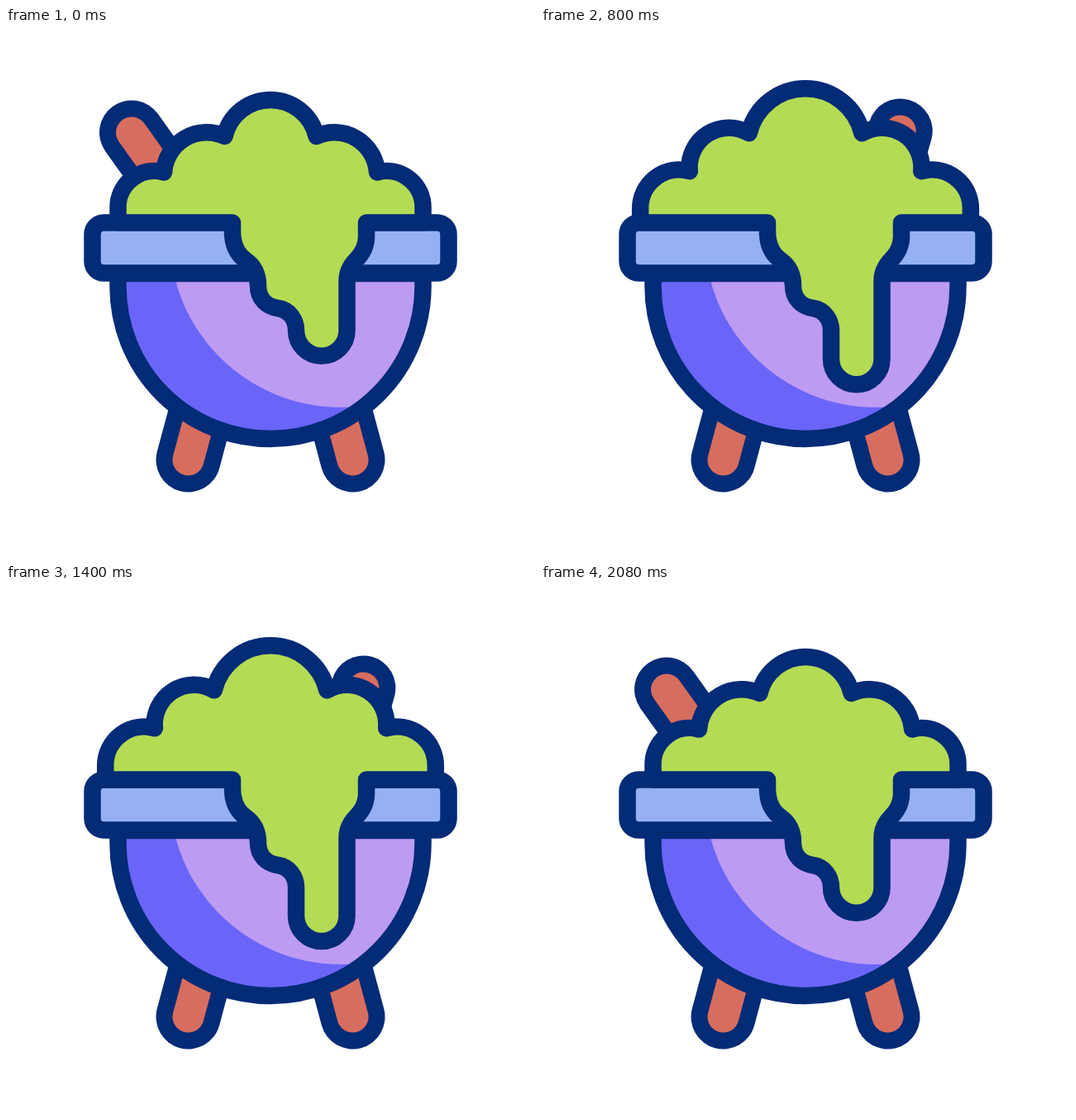
Recreate the animation shown at these times as an HTML page. Size 640 by 640 pixels, loop 2.2 s.

```html
<!DOCTYPE html>
<html lang="en">
<head>
<meta charset="utf-8">
<title>Bubbling cauldron</title>
<style>
  html, body { margin: 0; height: 100%; overflow: hidden; background: #fff; }
  svg { display: block; width: 100%; height: 100%; }
  .ink { stroke: #042b76; stroke-width: 20.5; stroke-linejoin: round; }
  .bar path { fill: none; stroke: #042b76; stroke-width: 78; stroke-linecap: round; }
  .bar path + path { stroke: #d76d5e; stroke-width: 38; }
</style>
</head>
<body>
<svg viewBox="0 0 640 640">
  <defs>
    <clipPath id="inside"><path d="M135.500 297V312.500A184.500 184.500 0 0 0 504.500 312.500V297Z"/></clipPath>
    <g id="leg" class="bar">
      <path d="M220.500 522.500L240 450"/>
      <path d="M220.500 522.500L240 450"/>
    </g>
  </defs>
  <use href="#leg"/>
  <use href="#leg" transform="matrix(-1 0 0 1 640 0)"/>
  <g id="spoon" class="bar"><path d="M0 0V95"/><path d="M0 0V95"/></g>
  <g clip-path="url(#inside)">
    <rect x="120" y="290" width="400" height="220" fill="#6a65f8"/>
    <circle cx="405" cy="252" r="207" fill="#bd9bf3"/>
  </g>
  <path class="ink" fill="none" d="M135.500 297V312.500A184.500 184.500 0 0 0 504.500 312.500V297Z"/>
  <rect class="ink" fill="#95b1f4" x="104.500" y="235.500" width="431" height="61" rx="14"/>
  <path id="goo" class="ink" fill="#b3db53"/>
</svg>
<script>
const LOOP = 2200, STEP = 40, MOVE = 790, RISE = 320, FALL = 1178;
const spoon = document.getElementById('spoon');
const goo = document.getElementById('goo');

// Cubic Bezier easing (.5, 0, .3, 1), solved by bisection
function ease(x) {
  if (x <= 0) return 0;
  if (x >= 1) return 1;
  let lo = 0, hi = 1;
  for (let i = 0; i < 24; i++) {
    const s = (lo + hi) / 2, r = 1 - s;
    if (1.5 * r * r * s + 0.9 * r * s * s + s * s * s < x) lo = s; else hi = s;
  }
  return lo * lo * (3 - 2 * lo);
}

function gooPath(p) {
  const mix = (a, b) => a + (b - a) * p;
  const side = mix(184.5, 203);
  const outer = [mix(129, 142.5), mix(174.5, 173)];
  const inner = [mix(55.5, 71), mix(131, 126.5)];
  const arc = (r, x, y) => `A${r} ${r} 0 0 1 ${320 + x} ${y}`;
  const rSide = mix(44, 47.5), rMid = mix(52, 47), rTop = mix(57, 73);
  const drip = mix(366, 407.5);
  return `M${320 - side} 235.5V218` +
    arc(rSide, -outer[0], outer[1]) + arc(rMid, -inner[0], inner[1]) +
    arc(rTop, inner[0], inner[1]) +
    arc(rMid, outer[0], outer[1]) + arc(rSide, side, 218) +
    'V235.5H436V252C436 264 431 273 424 280C416 288 412.5 296 412.5 306' +
    `V${drip}A30.75 30.75 0 0 1 351 ${drip}V366` +
    'C351 353 343 341 329 339C316 337 305 328 305 312' +
    'C305 298 300 288 290 281C280 274 274 262 274 246V235.5Z';
}

function draw(now) {
  const t = Math.floor(now % LOOP / STEP) * STEP;
  const p = ease((t - RISE) / MOVE) - ease((t - FALL) / MOVE);
  const x = 340 * p;
  spoon.setAttribute('transform',
    `translate(${152 + x} ${126.5 - 2.5 * p}) rotate(${-35.5 + 0.182 * x})`);
  goo.setAttribute('d', gooPath(p));
}

const start = performance.now();
function tick() {
  draw(performance.now() - start);
  requestAnimationFrame(tick);
}
tick();
</script>
</body>
</html>
```
